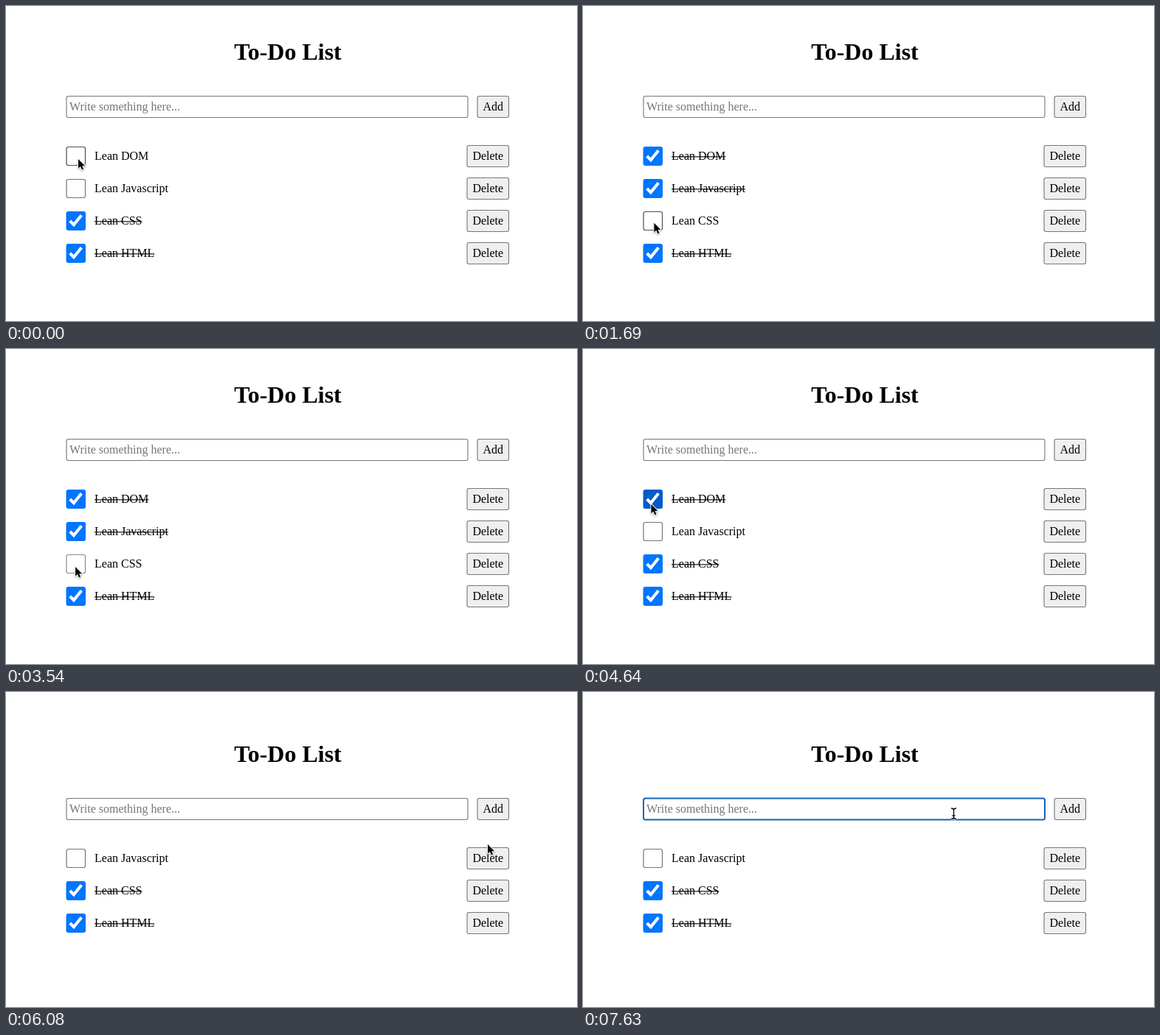
Write an HTML page with a canvas that moves like this. It is 774 by 428 pixels and loops after 8000 ms.

```html
<!DOCTYPE html>
<html lang="en">
<head>
<meta charset="utf-8">
<title>To-Do List</title>
<style>
  html, body { margin: 0; width: 100%; height: 100%; overflow: hidden; background: #fff; }
  canvas { display: block; }
</style>
</head>
<body>
<canvas id="stage" width="774" height="428"></canvas>
<script>
const ctx = document.getElementById('stage').getContext('2d');
const SERIF = '"Liberation Serif", "Times New Roman", serif';
const LOOP = 8000, TICK = 80, PRESS = 160;
const DELETED_AT = 5920, FOCUSED_AT = 7140;
const ROW_HEIGHT = 44;

const tasks = [
  { text: 'Lean DOM', done: false },
  { text: 'Lean Javascript', done: false },
  { text: 'Lean CSS', done: true },
  { text: 'Lean HTML', done: true },
];

// The pointer walks down the list and back up, toggling each task on release.
const releases = [240, 960, 1600, 2400, 3130, 3700, 4270, 4880];
const clicks = releases.map((up, i) => ({ up, row: Math.min(i, 7 - i) }));

// Each leg glides from wherever the pointer is to its own end point.
const legs = [
  ...clicks.map(({ row }, i) => ({
    start: i ? releases[i - 1] + 160 : 0,
    duration: 240,
    x: 98 - i * .8,
    y: Math.min(328, 208 + row * 43) + i * .4,
  })),
  { start: 5120, duration: 560, x: 635, y: 210, arch: 36 },
  { start: 5680, duration: 400, x: 653, y: 207 },
  { start: 6560, duration: 480, x: 502, y: 165 },
];

const easeOut = k => 1 - (1 - k) ** 3;

function pointerAt(time) {
  const t = time - time % TICK;
  let { x, y } = legs[0];
  for (const leg of legs.filter(l => l.start <= t)) {
    const k = easeOut(Math.min(1, (t - leg.start) / leg.duration));
    x += (leg.x - x) * k;
    y += (leg.y - y) * k - (leg.arch || 0) * Math.sin(Math.PI * k);
  }
  return [x, y];
}

const inside = ([px, py], x, y, w, h) => px >= x && px <= x + w && py >= y && py <= y + h;
const stateOf = (hovered, pressed) => pressed ? 'active' : hovered ? 'hover' : 'normal';

const BORDER = { normal: '#767676', hover: '#4f4f4f', active: '#8d8d8d' };
const BUTTON = { normal: '#efefef', hover: '#e5e5e5', active: '#f5f5f5' };
const CHECKED = { normal: '#0075ff', hover: '#005cc8', active: '#3793ff' };

function box(x, y, w, h, fill, stroke, lineWidth = 1.1, radius = 2.5) {
  ctx.beginPath();
  ctx.roundRect(x + .5, y + .5, w - 1, h - 1, radius);
  ctx.fillStyle = fill;
  ctx.fill();
  ctx.strokeStyle = stroke;
  ctx.lineWidth = lineWidth;
  ctx.stroke();
}

function label(text, x, baseline, { font = '16px', color = '#000', align = 'left' } = {}) {
  ctx.font = `${font} ${SERIF}`;
  ctx.textAlign = align;
  ctx.fillStyle = color;
  ctx.fillText(text, x, baseline);
}

function button(text, x, y, w, state) {
  box(x, y, w, 30, BUTTON[state], BORDER[state]);
  label(text, x + w / 2, y + 20, { align: 'center' });
}

function checkbox(x, y, checked, state) {
  if (!checked) {
    box(x, y, 26.5, 26, '#fff', BORDER[state], 1.2);
    return;
  }
  box(x, y, 26.5, 26, CHECKED[state], CHECKED[state], 1, 2);
  ctx.beginPath();
  ctx.moveTo(x + 5.2, y + 13);
  ctx.lineTo(x + 10.4, y + 18.2);
  ctx.lineTo(x + 20.8, y + 5.2);
  ctx.strokeStyle = '#fff';
  ctx.lineWidth = 4.1;
  ctx.stroke();
}

function taskRow(task, row, y, t, pointer) {
  const own = clicks.filter(c => c.row === row);
  const toggled = own.filter(c => t >= c.up).length % 2 === 1;
  const done = task.done !== toggled;
  const pressed = own.some(c => t >= c.up - PRESS && t < c.up);
  checkbox(81.5, y - 13, done, stateOf(inside(pointer, 82, y - 13, 26, 26), pressed));
  label(task.text, 120, y + 5);
  if (done) ctx.fillRect(120, y + .3, ctx.measureText(task.text).width, 1.1);

  const deleting = row === 0 && t >= DELETED_AT - PRESS;
  button('Delete', 624.5, y - 15, 57.5, stateOf(inside(pointer, 624, y - 15, 58, 30), deleting));
}

function arrow(x, y) {
  const shape = new Path2D('M0 0V12.6L2.9 9.9L5 14.6L7.2 13.6L5.1 9.2H9.1Z');
  ctx.save();
  ctx.translate(x, y);
  ctx.lineJoin = 'round';
  ctx.shadowColor = 'rgba(0,0,0,.35)';
  ctx.shadowBlur = 2;
  ctx.shadowOffsetY = 1;
  ctx.strokeStyle = '#fff';
  ctx.lineWidth = 2;
  ctx.stroke(shape);
  ctx.shadowColor = 'transparent';
  ctx.fillStyle = '#000';
  ctx.fill(shape);
  ctx.restore();
}

function textCursor(x, y) {
  const shape = new Path2D('M-3.5 -7Q0 -7 0 -4.5Q0 -7 3.5 -7M0 -5V6M-3.5 7.5Q0 7.5 0 5Q0 7.5 3.5 7.5M-2 3H2');
  ctx.save();
  ctx.translate(x + .5, y);
  for (const [color, width] of [['#fff', 3], ['#111', 1.4]]) {
    ctx.strokeStyle = color;
    ctx.lineWidth = width;
    ctx.stroke(shape);
  }
  ctx.restore();
}

function draw(t) {
  const pointer = pointerAt(t);
  const focused = t >= FOCUSED_AT;
  const removed = t >= DELETED_AT ? 1 : 0;
  const top = removed * ROW_HEIGHT / 2; // the page is centred vertically
  ctx.fillStyle = '#fff';
  ctx.fillRect(0, 0, 774, 428);

  label('To-Do List', 382, 72.5 + top, { font: 'bold 32px', align: 'center' });
  box(81.5, 122 + top, 545, 30, '#fff', focused ? '#1264b8' : BORDER.normal, focused ? 2 : 1.1);
  label('Write something here...', 86, 142 + top, { color: '#757575' });
  if (focused && (t - FOCUSED_AT) % 980 < 490) {
    ctx.fillStyle = '#000';
    ctx.fillRect(86, 128 + top, 1, 18);
  }
  button('Add', 638.5, 122 + top, 43.5, 'normal');

  tasks.slice(removed).forEach((task, i) =>
    taskRow(task, i + removed, 204 + top + i * ROW_HEIGHT, t, pointer));

  const overInput = inside(pointer, 82, 122 + top, 545, 30);
  (overInput ? textCursor : arrow)(...pointer);
}

const start = performance.now();
function frame() {
  draw((performance.now() - start) % LOOP);
  requestAnimationFrame(frame);
}
frame();
</script>
</body>
</html>
```
